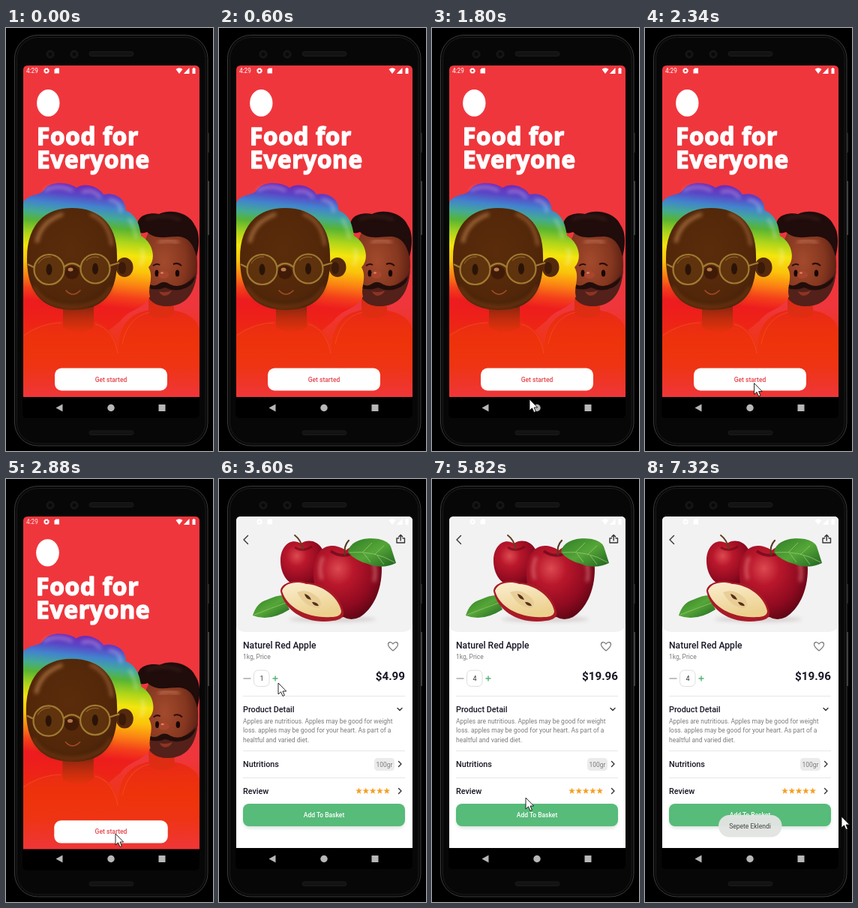
Animation, 276 px wide and 564 px high, one loop 7.38 s. Source, as an HTML page:

```html
<!DOCTYPE html>
<html lang="en">
<head>
<meta charset="utf-8">
<title>Food app</title>
<style>
  html, body { margin: 0; width: 100%; height: 100%; overflow: hidden; background: #000; }
  svg { display: block; width: 276px; height: 564px; }
  text { font-family: Roboto, Inter, sans-serif; font-size: 8.5px; }
  .title { font: 700 31.5px "Open Sans", "Noto Sans", sans-serif; letter-spacing: .7px; fill: #fff; stroke: #fff; stroke-width: 1.5; stroke-linejoin: round; }
  .head { font-size: 10.8px; font-weight: 500; fill: #181725; }
  .soft { fill: #7c7c7c; }
  .line { fill: none; stroke: #333; stroke-width: 1.4; stroke-linecap: round; stroke-linejoin: round; }
</style>
</head>
<body>
<svg viewBox="0 0 276 564" xmlns="http://www.w3.org/2000/svg">
  <defs>
    <clipPath id="screen"><path d="M23 494V56q0-6 6-6H252q6 0 6 6V494Z"/></clipPath>
    <clipPath id="faceClip"><path id="manFace" d="M217 256C244 256 256 286 255 318C254 352 241 371 214 371C190 371 181 352 181 320C181 284 191 256 217 256Z"/></clipPath>
    <linearGradient id="rainbow" gradientUnits="userSpaceOnUse" x1="85" y1="206" x2="68" y2="376">
      <stop offset="0" stop-color="#7427b4"/><stop offset=".09" stop-color="#5a45c6"/>
      <stop offset=".17" stop-color="#4284cd"/><stop offset=".25" stop-color="#43ab92"/>
      <stop offset=".32" stop-color="#58b433"/><stop offset=".42" stop-color="#acd41b"/>
      <stop offset=".52" stop-color="#f3e50d"/><stop offset=".64" stop-color="#fbc40b"/>
      <stop offset=".75" stop-color="#fb8313"/><stop offset=".85" stop-color="#f4401b"/>
      <stop offset=".94" stop-color="#ed1c1e"/>
    </linearGradient>
    <radialGradient id="skin" cx=".48" cy=".42" r=".62">
      <stop offset="0" stop-color="#5a2c0b"/><stop offset=".75" stop-color="#522709"/><stop offset="1" stop-color="#43200b"/>
    </radialGradient>
    <radialGradient id="tan" cx=".4" cy=".48" r=".65">
      <stop offset="0" stop-color="#a34a2d"/><stop offset=".6" stop-color="#85371f"/><stop offset="1" stop-color="#571d12"/>
    </radialGradient>
    <linearGradient id="neck" x1="0" y1="0" x2="0" y2="1">
      <stop offset="0" stop-color="#6a2110"/><stop offset="1" stop-color="#d9300f"/>
    </linearGradient>
    <radialGradient id="apple" cx=".36" cy=".32" r=".75">
      <stop offset="0" stop-color="#dc4a50"/><stop offset=".3" stop-color="#b9172b"/>
      <stop offset=".7" stop-color="#8f0a20"/><stop offset="1" stop-color="#570513"/>
    </radialGradient>
    <linearGradient id="flesh" x1="0" y1="0" x2=".3" y2="1">
      <stop offset="0" stop-color="#fbeed0"/><stop offset="1" stop-color="#ecd08e"/>
    </linearGradient>
    <linearGradient id="leaf" x1="0" y1="0" x2="1" y2="1">
      <stop offset="0" stop-color="#2f7d25"/><stop offset=".5" stop-color="#55a638"/><stop offset="1" stop-color="#1f6320"/>
    </linearGradient>
    <linearGradient id="shirt" x1="0" y1="0" x2="0" y2="1">
      <stop offset="0" stop-color="#e8271a"/><stop offset=".4" stop-color="#ee3210"/><stop offset="1" stop-color="#f0363a"/>
    </linearGradient>
    <linearGradient id="floor" x1="0" y1="0" x2="0" y2="1">
      <stop offset="0" stop-color="#ee3206" stop-opacity="0"/><stop offset=".4" stop-color="#ee3408" stop-opacity=".85"/>
      <stop offset=".65" stop-color="#ee3410"/><stop offset="1" stop-color="#ef363a"/>
    </linearGradient>
    <filter id="blur" x="-50%" y="-50%" width="200%" height="200%"><feGaussianBlur stdDeviation="2.5"/></filter>
  </defs>

  <rect width="276" height="564"/>
  <g id="phone">
    <path d="M270 204V276" stroke="#4a4a4a" stroke-width="1.800"/>
    <path d="M270 140V166" stroke="#262626" stroke-width="1.800"/>
    <rect x="11.500" y="9.500" width="257.500" height="547.500" rx="31" fill="#080808" stroke="#3a3a3b"/>
    <rect x="14.500" y="12.500" width="251.500" height="541.500" rx="28" fill="#070707" stroke="#1b1b1b"/>
    <g fill="#131313" stroke="#1b1b1b">
      <rect x="111" y="31.500" width="59" height="6" rx="3"/>
      <rect x="111" y="537" width="59" height="5.500" rx="2.700"/>
      <circle cx="59" cy="35" r="5"/><circle cx="91" cy="35" r="5"/>
    </g>
    <circle cx="59" cy="35" r="2.200" fill="#08080a"/><circle cx="91" cy="35" r="2.200" fill="#08080a"/>
  </g>

  <g clip-path="url(#screen)">
    <rect x="22" y="50" width="236" height="444" fill="#000"/>
    <g id="welcome">
      <rect x="22" y="49" width="236" height="444" fill="#ef363d"/>
      <ellipse cx="56.300" cy="100" rx="15.200" ry="18" fill="#fff"/>
      <text class="title" x="41" y="156">Food for</text>
      <text class="title" x="41" y="187">Everyone</text>

      <g id="beardedMan">
        <path d="M150 493V425C152 392 168 380 191 376H219C242 378 255 389 258 402V493Z" fill="url(#shirt)"/>
        <path d="M190 362H224V382Q207 392 190 382Z" fill="#dc2c14"/>
        <use href="#manFace" fill="url(#tan)"/>
        <g clip-path="url(#faceClip)">
          <path d="M180 336Q192 347 203 344Q212 337 223 344Q240 347 256 322V375H180Z" fill="#54201a"/>
          <path d="M186 338Q196 347 204 341Q211 336 219 342Q235 349 252 331Q251 341 241 346Q226 353 212 346Q200 351 188 346Z" fill="#220d0a"/>
          <path d="M204 351Q212 354 221 350Q218 357 211 357Q206 356 204 351Z" fill="#8c3522"/>
        </g>
        <path d="M175 262C176 248 194 246 204 248C221 240 244 247 251 262C259 273 258 290 254 305C250 288 243 279 230 278C214 278 200 283 188 272C179 276 172 271 175 262Z" fill="#1f0c0b"/>
        <path d="M187 255Q210 246 233 256" fill="none" stroke="#5b3632" stroke-width="3" opacity=".5" filter="url(#blur)"/>
        <path d="M203 286Q216 281 230 286" fill="none" stroke="#d98a70" stroke-width="4" opacity=".6" filter="url(#blur)"/>
        <ellipse cx="201" cy="327" rx="2.500" ry="4.500" fill="#170606"/>
        <ellipse cx="228.500" cy="327" rx="2.700" ry="4.500" fill="#170606"/>
        <path d="M196 317q5-4 9-1M223 315q6-3 11 2" fill="none" stroke="#2c0d09" stroke-width="2"/>
        <ellipse cx="210" cy="329" rx="7" ry="5" fill="#a8462d"/>
        <ellipse cx="208" cy="326.500" rx="2" ry="1.200" fill="#dd8266"/>
      </g>

      <g id="rainbowPerson">
        <path d="M22 235C28 219 47 225 51 215C63 201 88 208 94 213C106 205 124 212 130 222C147 218 161 230 159 243C175 249 178 264 180 277C196 286 201 308 190 319C198 333 188 346 192 358C183 376 165 374 153 390L128 411H22Z" fill="url(#rainbow)"/>
        <path d="M51 217Q69 207 89 217M101 219Q117 213 126 227M137 229Q153 230 153 246M164 254Q172 266 174 281M181 294Q186 307 179 316" fill="none" stroke="#fff" stroke-width="4" opacity=".3" filter="url(#blur)"/>
        <path d="M22 493V409C35 398 55 393 73 391H118C138 398 146 413 150 435V493Z" fill="url(#shirt)"/>
        <path d="M76 359H117V399Q97 411 76 399Z" fill="url(#neck)"/>
        <path d="M108 374V398" stroke="#f0593a" stroke-width="5" opacity=".5" filter="url(#blur)"/>
        <ellipse cx="158" cy="319" rx="11.500" ry="13" fill="#55290c"/>
        <ellipse cx="155" cy="320" rx="5" ry="8" fill="#3a1a08"/>
        <path d="M88 240C127 240 148 264 148 303C149 340 141 376 90 376C40 376 28 343 28 307C28 264 50 240 88 240Z" fill="url(#skin)"/>
        <path d="M41 286Q46 258 76 248" fill="none" stroke="#c98a55" stroke-width="5" opacity=".65" filter="url(#blur)"/>
        <path d="M112 248Q137 256 141 290" fill="none" stroke="#d18a55" stroke-width="4" opacity=".5" filter="url(#blur)"/>
        <path d="M37 345Q50 371 88 372Q128 371 140 345" fill="none" stroke="#8a4418" stroke-width="4" opacity=".6" filter="url(#blur)"/>
        <g fill="#6f4612" fill-opacity=".35" stroke="#a07a33" stroke-width="2.200">
          <circle cx="57.500" cy="322" r="20"/><circle cx="119" cy="321" r="19.500"/>
          <path d="M77 319Q88 309 99.500 319M138 317L151 313M37 319L29 315" fill="none"/>
        </g>
        <path d="M43 314Q49 304 60 305M107 310Q115 303 124 306" fill="none" stroke="#c9a150" opacity=".5"/>
        <ellipse cx="57.500" cy="322" rx="4" ry="7.500" fill="#2a1407"/><ellipse cx="119" cy="321" rx="4" ry="7.500" fill="#2a1407"/>
        <ellipse cx="88" cy="326" rx="9.500" ry="9" fill="#3f1b07"/>
        <ellipse cx="86" cy="322" rx="3.500" ry="2.500" fill="#b87949"/>
        <path d="M80 350Q89 360 99 350" fill="none" stroke="#a34c2a" stroke-width="1.600" stroke-linecap="round"/>
      </g>
      <rect x="22" y="370" width="236" height="123" fill="url(#floor)" opacity=".8"/>
      <path d="M24 410Q48 393 74 393M119 395Q143 401 149 434M155 421Q162 386 191 379" fill="none" stroke="#ff6b4c" opacity=".35"/>
      <rect x="65" y="453.500" width="150" height="30" rx="9" fill="#fff"/>
      <text x="140" y="471.500" text-anchor="middle" font-weight="500" font-size="8.400" fill="#e5434b">Get started</text>
    </g>

    <g id="product">
      <rect x="22" y="49" width="236" height="444" fill="#fff"/>
      <path d="M22 49H258V190Q258 204 244 204H36Q22 204 22 190Z" fill="#f2f2f3"/>
      <g id="fruit">
        <ellipse cx="151" cy="187" rx="58" ry="4" fill="#b9aaa8" opacity=".45" filter="url(#blur)"/>
        <path d="M45 182Q50 165 64 161Q77 155 85 155L94 174Q67 191 45 182Z" fill="url(#leaf)"/>
        <path d="M47 181Q70 172 92 164" fill="none" stroke="#9bc46a" stroke-width=".8"/>
        <path d="M109 86C124 76 142 88 142 110C143 132 130 148 111 145C92 142 82 127 82 109C82 89 96 78 109 86Z" fill="url(#apple)"/>
        <path d="M101 91Q111 98 124 90" fill="none" stroke="#6f0918" stroke-width="3" opacity=".65"/>
        <path d="M112 93Q109 81 101 75" fill="none" stroke="#61401f" stroke-width="2" stroke-linecap="round"/>
        <path d="M169 95C184 82 218 84 217 120C217 151 204 174 188 184Q176 190 166 184C146 187 127 160 126 130C124 94 145 80 169 95Z" fill="url(#apple)"/>
        <path d="M149 96Q167 109 188 93" fill="none" stroke="#65071a" stroke-width="4" opacity=".7"/>
        <path d="M168 101Q166 89 173 82" fill="none" stroke="#5a3b20" stroke-width="2.200" stroke-linecap="round"/>
        <path d="M139 104Q132 117 137 134M203 104Q211 119 207 137" fill="none" stroke="#f29b99" stroke-width="4" opacity=".55" filter="url(#blur)"/>
        <path d="M172 98C174 82 195 77 213 80Q226 83 229 90L236 112Q218 121 198 113Q182 109 172 98Z" fill="url(#leaf)"/>
        <path d="M174 98Q207 95 234 111M191 98L204 85M207 101L220 89M193 99L202 111M211 102L220 114" fill="none" stroke="#a7cf7c" stroke-width=".7"/>
        <path d="M82 150C82 138 103 133 116 138C142 138 161 154 166 177Q168 187 152 189C119 194 89 179 82 150Z" fill="#a91a27"/>
        <path d="M84 149C88 138 104 136 116 140C138 141 159 157 163 176Q163 184 149 184C119 186 90 172 84 149Z" fill="url(#flesh)"/>
        <path d="M104 151Q119 145 133 159Q139 167 133 172Q115 172 104 151Z" fill="#e6ca91" opacity=".8"/>
        <path d="M114 153q7 2 9 8q-8-1-9-8ZM124 164q7 0 9 5q-7 1-9-5Z" fill="#55301b"/>
      </g>
      <path class="line" d="M38.500 75.500L33 81L38.500 86.500"/>
      <path class="line" d="M239.500 79H237V85H247.500V79H245M242.200 82V74.500M239.700 77L242.200 74.500L244.700 77"/>
      <text class="head" x="32" y="226" style="font-size:12.1px">Naturel Red Apple</text>
      <text class="soft" x="32" y="240">1kg, Price</text>
      <path class="line" d="M232 229C227 225 225.500 223 225.500 220.500C225.500 217 230 216.500 232 220C234 216.500 238.500 217 238.500 220.500C238.500 223 237 225 232 229Z" style="stroke:#777;stroke-width:1.2"/>
      <path class="line" d="M33 266H42" style="stroke:#aaa"/>
      <path class="line" d="M72 266H78M75 263V269" style="stroke:#53b175"/>
      <rect x="46.500" y="255" width="20.500" height="21.500" rx="6" fill="#fff" stroke="#dedede"/>
      <text id="count" x="57" y="269" text-anchor="middle" style="font-size:9px" fill="#333">1</text>
      <text id="price" x="248" y="268" text-anchor="end" style="font-size:15.2px;font-weight:700" fill="#181725"></text>
      <path d="M32 289.500H248M32 362.500H248M32 398.500H248" stroke="#e7e7e7"/>
      <text class="head" x="32" y="310.500">Product Detail</text>
      <path class="line" d="M238 305.500L241 308.500L244 305.500"/>
      <text class="soft" x="32" y="325.500">Apples are nutritious. Apples may be good for weight</text>
      <text class="soft" x="32" y="338">loss. apples may be good for your heart. As part of a</text>
      <text class="soft" x="32" y="350.500">healtful and varied diet.</text>
      <text class="head" x="32" y="384">Nutritions</text>
      <rect x="207" y="372" width="27" height="17" rx="4.500" fill="#ebebeb"/>
      <text class="soft" x="220.500" y="384" text-anchor="middle">100gr</text>
      <path class="line" d="M239.500 376.500L243 380L239.500 383.500M239.500 412.500L243 416L239.500 419.500"/>
      <text class="head" x="32" y="420">Review</text>
      <g id="stars" fill="#f3a126"></g>
      <rect x="33" y="435" width="214" height="30" rx="8" fill="#8eae99" opacity=".4" filter="url(#blur)"/>
      <rect x="32" y="433" width="216" height="30" rx="8" fill="#57bb79"/>
      <text x="140" y="451.300" text-anchor="middle" font-weight="500" fill="#fff">Add To Basket</text>
    </g>

    <g id="status" fill="#fff">
      <text id="clock" x="27" y="60" style="font-size:8.2px">4:29</text>
      <circle cx="54" cy="57" r="2.400" fill="none" stroke="#fff" stroke-width="1.600"/>
      <circle cx="54" cy="57" r="3.500" fill="none" stroke="#fff" stroke-dasharray="1.400 1.350"/>
      <path d="M66.500 53.500H71V60.500H64.500V55.500Z"/>
      <path d="M226.500 55Q231 51.500 235.500 55L231 61ZM244.500 53V61H236.800ZM248.500 54H249.500V53H251.500V54H252.500V61H248.500Z"/>
    </g>
  </g>

  <g id="navigation">
    <path id="navBar" d="M22 492H258V514Q258 520 252 520H28Q22 520 22 514Z" fill="#000"/>
    <path d="M75.500 501.500V511.500L66.500 506.500Z" fill="#b7b7b7"/>
    <circle cx="140" cy="506.500" r="4.700" fill="#b7b7b7"/>
    <rect x="203.500" y="502" width="9" height="9" fill="#b7b7b7"/>
  </g>
  <g id="toast">
    <rect x="98" y="448" width="84.500" height="29.500" rx="14.700" fill="#e2e4e2" fill-opacity=".96"/>
    <text x="140" y="466.300" text-anchor="middle" fill="#444">Sepete Eklendi</text>
  </g>
  <path id="cursor" d="M0 0V15L3.500 11.800L6 17.500L8.400 16.400L6 11H10.700Z" fill="#fff" stroke="#111" stroke-width=".9"/>
</svg>

<script>
const LOOP = 7380, OPEN = 2840, OPEN_TIME = 340;
const CLICKS = [4020, 4440, 4860];
const TOAST = 6420;
// time, x, y of the pointer tip
const PATH = [
  [1600, 122, 565], [1680, 124, 541], [1800, 130, 495], [2400, 146, 473], [3200, 146, 473],
  [3540, 79, 272], [5060, 79, 272], [5420, 125, 425], [5880, 125, 425], [6180, 131, 444],
  [6660, 131, 444], [7020, 238, 449], [7140, 262, 450], [LOOP, 262, 450]
];

const $ = id => document.getElementById(id);
const clamp = v => Math.max(0, Math.min(1, v));
const smooth = v => v * v * (3 - 2 * v);
const zoom = s => `translate(140 271) scale(${s}) translate(-140 -271)`;

function star(cx, cy) {
  const points = Array.from({ length: 10 }, (_, i) => {
    const r = i % 2 ? 1.9 : 4.6, a = i * Math.PI / 5 - Math.PI / 2;
    return `${cx + r * Math.cos(a)},${cy + r * Math.sin(a)}`;
  });
  return `<polygon points="${points.join(" ")}"/>`;
}
$("stars").innerHTML = [0, 1, 2, 3, 4].map(i => star(186.5 + i * 9.3, 416)).join("");

function pointerAt(t) {
  const next = PATH.findIndex(p => p[0] > t);
  if (next < 1) return null;
  const [t0, x0, y0] = PATH[next - 1], [t1, x1, y1] = PATH[next];
  const k = smooth((t - t0) / (t1 - t0));
  return [x0 + (x1 - x0) * k, y0 + (y1 - y0) * k];
}

function draw(t) {
  const p = clamp((t - OPEN) / OPEN_TIME);
  const eased = 1 - (1 - p) ** 3;
  $("welcome").setAttribute("transform", zoom(1 + .05 * Math.min(1, p * 1.6)));
  $("welcome").style.display = p < 1 ? "" : "none";
  $("product").setAttribute("transform", zoom(.85 + .15 * eased));
  $("product").style.opacity = clamp((p - .125) / .25);
  $("clock").style.opacity = 1 - p;
  $("navBar").setAttribute("transform", `translate(0 ${p > 0 && p < 1 ? 1.5 : 0})`);

  const count = 1 + CLICKS.filter(c => t >= c).length;
  $("count").textContent = count;
  $("price").textContent = "$" + (4.99 * count).toFixed(2);
  $("toast").style.opacity = clamp((t - TOAST) / 200);

  const tip = pointerAt(t);
  $("cursor").style.display = tip ? "" : "none";
  if (tip) $("cursor").setAttribute("transform", `translate(${tip})`);
}

const start = performance.now();
function tick() {
  draw((performance.now() - start) % LOOP);
  requestAnimationFrame(tick);
}
draw(0);
requestAnimationFrame(tick);
</script>
</body>
</html>
```
